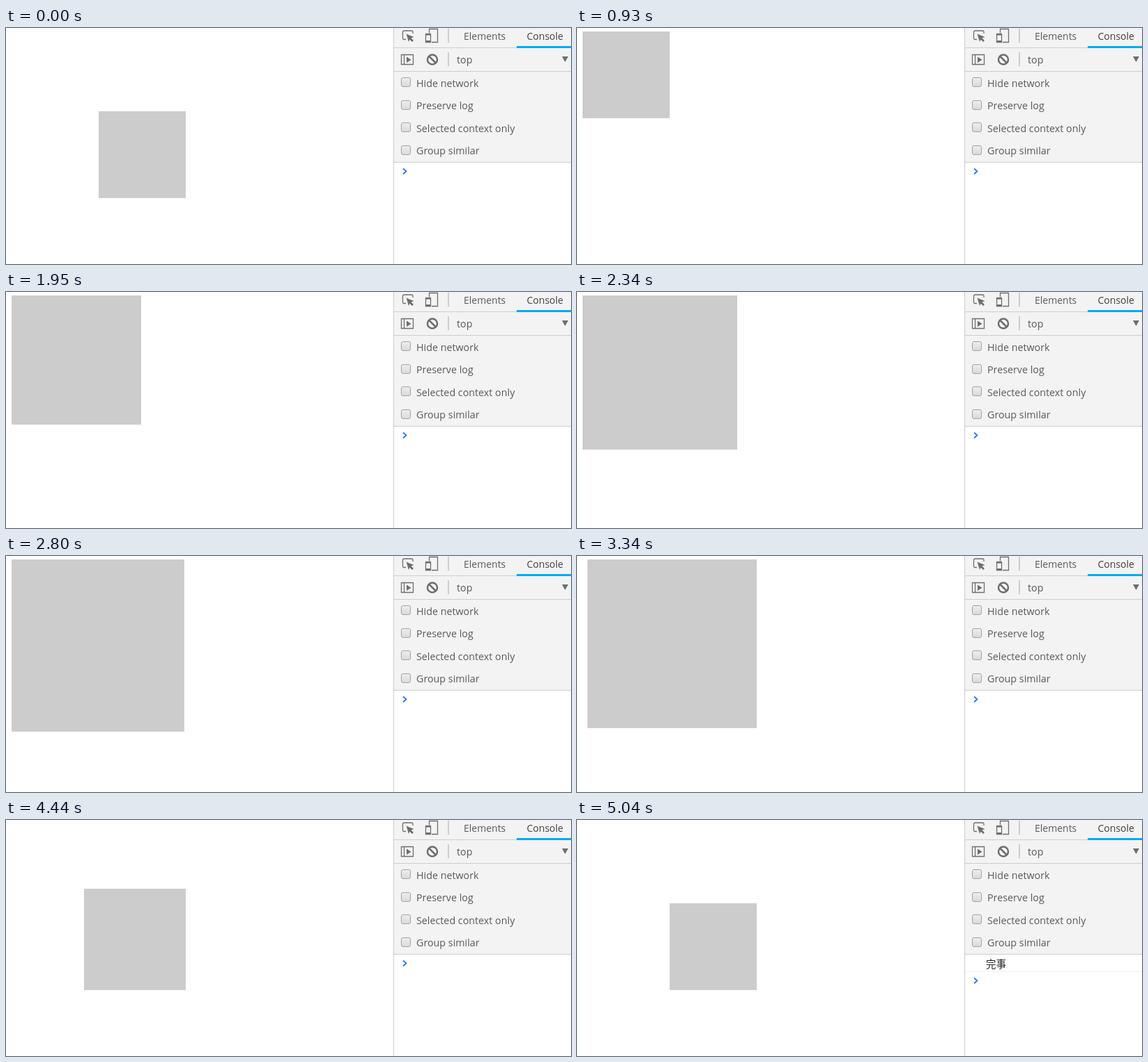
An HTML page for the animation above (5.96 s loop, 811x340 px).

```html
<!DOCTYPE html>
<html lang="en">
<head>
<meta charset="utf-8">
<title>Resizing square with console</title>
<style>
  html, body { margin: 0; width: 100%; height: 100%; overflow: hidden; background: #fff; }
  svg { display: block; width: 811px; height: 340px; }
  text { font-family: "Open Sans", "Noto Sans", sans-serif; font-size: 14.3px; fill: #5a5a5a; }
  .tab { font-size: 14px; }
  #log text { font-family: "Noto Sans CJK SC", "Noto Sans CJK", sans-serif; font-size: 14.5px; fill: #222; }
  .icon { fill: none; stroke: #6e6e6e; stroke-width: 1.3; }
  .solid { fill: #6e6e6e; }
  .rule { fill: #cdcdcd; }
</style>
</head>
<body>
<svg viewBox="0 0 811 340">
  <defs>
    <linearGradient id="shade" x2="0" y2="1">
      <stop stop-color="#eee"/><stop offset="1" stop-color="#dadada"/>
    </linearGradient>
  </defs>
  <rect id="square" fill="#ccc" shape-rendering="crispEdges"/>

  <g id="panel">
    <rect x="557" width="254" height="193" fill="#f3f3f3"/>
    <g class="rule">
      <rect x="556" width="1" height="340"/>
      <rect x="557" y="28" width="254" height="1"/>
      <rect x="557" y="62" width="254" height="1"/>
      <rect x="557" y="193" width="254" height="1"/>
      <rect x="634" y="1" width="2" height="20"/>
      <rect x="634" y="35" width="2" height="20"/>
    </g>
    <rect x="733" y="26" width="78" height="3" fill="#03a9f4"/>

    <path class="icon" d="M574 16.5H571Q569.5 16.5 569.5 15V5.5Q569.5 4 571 4H582.5Q584 4 584 5.5V8"/>
    <path class="solid" d="M574.5 8.5L585.5 13L581.5 14.5L585 18L583 20L579.5 16.5L578 20Z"/>
    <path class="icon" d="M607.5 7V1.5H619.5V20.5H611"/>
    <path class="icon" d="M602.5 8.5H609.5V20.5H602.5Z"/>
    <rect class="solid" x="602" y="8" width="8" height="2.5"/>
    <rect class="solid" x="602" y="18" width="8" height="3"/>

    <path class="icon" d="M567.5 38.5H584.5V52.5H567.5ZM571.5 38.5V52.5"/>
    <path class="solid" d="M575 41.5L581.5 45.7L575 50Z"/>
    <g class="icon" style="stroke-width:2.5">
      <circle cx="612" cy="45.5" r="7"/>
      <path d="M607 40.5L617 50.5"/>
    </g>
    <path class="solid" d="M798 41H807L802.5 49Z"/>

    <text class="tab" x="657" y="17">Elements</text>
    <text class="tab" x="747.5" y="17" style="fill:#404040">Console</text>
    <text x="647" y="51">top</text>
  </g>

  <g id="log">
    <text x="587" y="213">完事</text>
    <rect x="557" y="218" width="254" height="1" fill="#f0f0f0"/>
  </g>
  <path id="prompt" d="M570 202.5L574.3 206.5L570 210.5" fill="none" stroke="#367cf1" stroke-width="2"/>
</svg>
<script>
  const LOOP = 5960, RESET = 850, SHRINK = 3110, DONE = 5040;
  const SMALL = 125, LARGE = 250, DURATION = 2000;
  const get = id => document.getElementById(id);
  const square = get("square"), log = get("log"), prompt = get("prompt");

  function add(name, attrs, label = "") {
    const el = document.createElementNS("http://www.w3.org/2000/svg", name);
    for (const key in attrs) el.setAttribute(key, attrs[key]);
    el.textContent = label;
    get("panel").append(el);
  }

  ["Hide network", "Preserve log", "Selected context only", "Group similar"].forEach((label, i) => {
    const y = Math.round(78 + i * 32.6);
    add("rect", { x: 567.5, y: y - 6.5, width: 13, height: 13, rx: 2.5,
                  fill: "url(#shade)", stroke: "#a3a3a3" });
    add("text", { x: 589, y: Math.round(85 + i * 32.4) }, label);
  });

  function swing(t) {
    const p = Math.min(1, Math.max(0, t / DURATION));
    return 0.5 - Math.cos(p * Math.PI) / 2;
  }

  // The picture refreshes in discrete ticks on a 10 ms clock.
  function hold(t, start, step) {
    const tick = start + Math.floor((t - start) / step) * step;
    return Math.ceil(tick / 10) * 10;
  }

  function pose(t) {
    if (t < RESET) return [133, 120, SMALL];
    if (t < SHRINK) {
      const p = swing(hold(t, RESET, 78) - 968);
      return [8, 5, Math.round(SMALL + (LARGE - SMALL) * p)];
    }
    const p = swing(hold(t, SHRINK, 77.3) - 2970);
    const size = Math.round(LARGE - (LARGE - SMALL) * p);
    return [258 - size, Math.max(5, 245 - size), size];
  }

  function draw(t) {
    const [x, y, size] = pose(t);
    square.setAttribute("x", x);
    square.setAttribute("y", y);
    square.setAttribute("width", size);
    square.setAttribute("height", size);
    const done = t >= DONE;
    log.style.display = done ? "" : "none";
    prompt.setAttribute("transform", `translate(0 ${done ? 25 : 0})`);
  }

  const begin = performance.now();
  function frame() {
    draw((performance.now() - begin) % LOOP);
    requestAnimationFrame(frame);
  }
  draw(0);
  requestAnimationFrame(frame);
</script>
</body>
</html>
```
